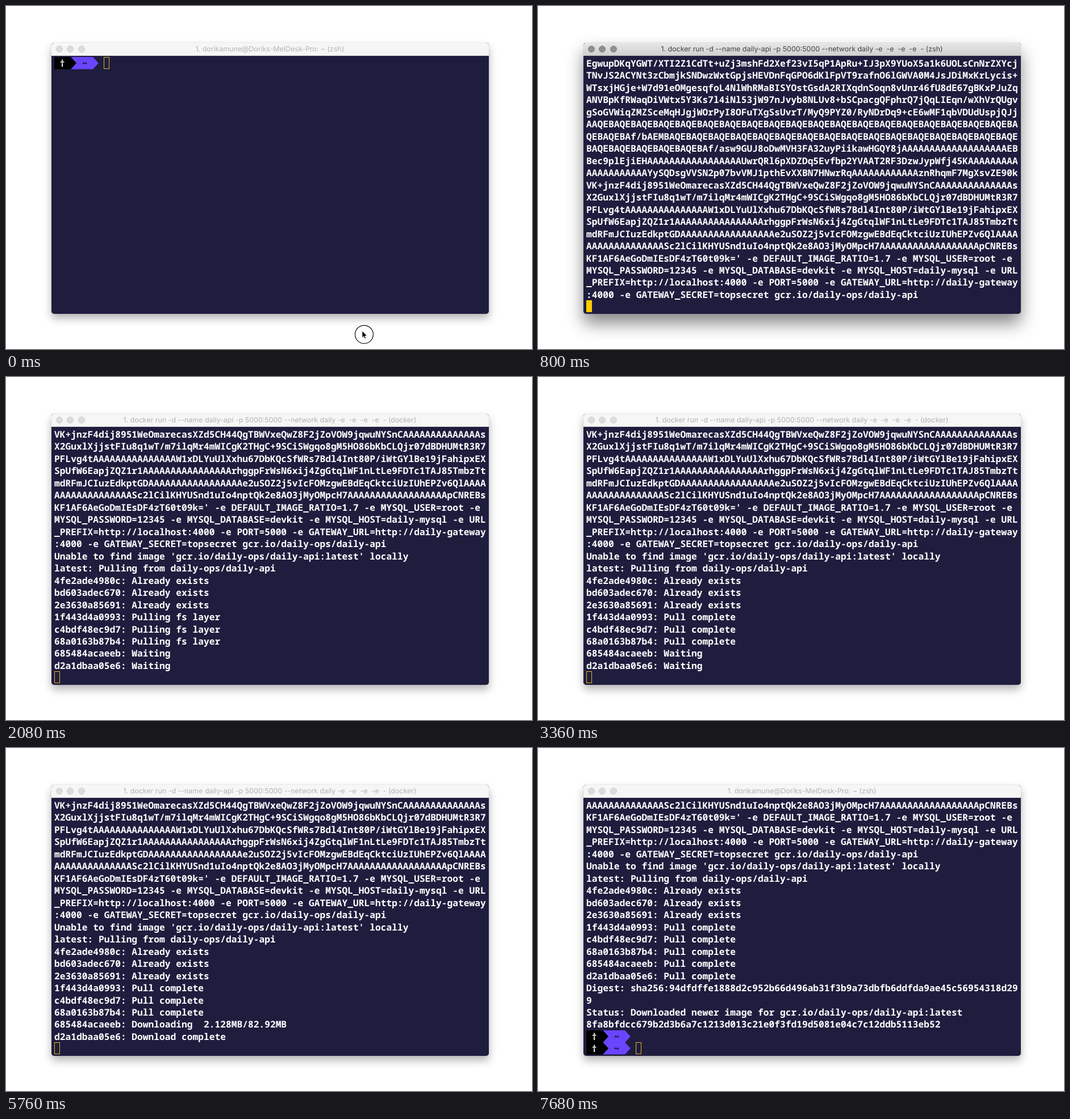
Write an HTML page that moves like this. It is 926x605 px and loops after 9.44 s.

```html
<!DOCTYPE html>
<html lang="en">
<head>
<meta charset="utf-8">
<title>Terminal</title>
<style>
  html, body { margin: 0; width: 100%; height: 100%; overflow: hidden; background: #fff; }
  #stage {
    --row: 21.47px;
    position: relative; width: 926px; height: 605px; overflow: hidden;
    text-rendering: geometricPrecision; font-kerning: none;
  }
  #stage * { position: absolute; box-sizing: border-box; }

  #window {
    left: 80px; top: 65px; width: 770px; height: 478px;
    border-radius: 5px; background: #1f1d3e;
    box-shadow: 0 0 1px rgba(0,0,0,.45), 0 8px 15px rgba(0,0,0,.3);
  }
  #bar {
    left: 0; top: 0; width: 770px; height: 23px;
    border-radius: 5px 5px 0 0; border-bottom: 1px solid #d4d4d4; background: #f6f6f6;
  }
  #bar i {
    top: 5px; width: 12px; height: 12px; border-radius: 50%;
    background: #dcdcdc; border: 1px solid #cfcfcf;
  }
  #title {
    left: 0; top: 0; width: 769px; text-align: center; white-space: pre;
    font: 12.45px/23px Inter, Roboto, sans-serif; color: #b3b3b3; font-kerning: auto;
  }
  .active #window { box-shadow: 0 0 1px rgba(0,0,0,.6), 0 17px 30px rgba(0,0,0,.47); }
  .active #bar { background: linear-gradient(#e8e7e8, #d1d0d1); border-color: #b2b1b2; }
  .active #bar i { background: #8f8f8f; border-color: #868686; }
  .active #title { color: #444; }

  #text {
    left: 85px; top: 91px; margin: 0; white-space: pre; color: #fff;
    font: 600 16.24px/var(--row) "Noto Sans Mono", "DejaVu Sans Mono", monospace;
    font-variant-ligatures: none;
  }
  .prompt { left: 85px; width: 78px; height: 21.5px; overflow: visible; }
  .prompt text { font: 700 16.24px "Noto Sans Mono", "DejaVu Sans Mono", monospace; text-anchor: middle; }
  #caret { width: 10px; height: 21px; border: 1px solid #e3b51c; }
  .active #caret { background: #fc0; border-color: #fc0; }
  #pointer { left: 0; top: 0; width: 926px; height: 605px; }
</style>
</head>
<body>
<div id="stage">
  <div id="window">
    <div id="bar">
      <i style="left:8px"></i><i style="left:27px"></i><i style="left:47px"></i>
      <div id="title"></div>
    </div>
  </div>
  <pre id="text"></pre>
  <div id="caret"></div>
  <svg id="pointer" fill="none">
    <circle id="ring" r="16" stroke="#111118" stroke-width="1.2"/>
    <path id="arrow" d="M627 573v12.3l2.8-2.6 1.9 4.2 2-.9-1.9-4.1h3.9z" fill="#000" stroke="#fff" stroke-width=".8"/>
    <path id="beam" d="M-2-8q2 0 2 2v12q0 2-2 2M2-8q-2 0-2 2M0 6q0 2 2 2" stroke="#9696a2"/>
  </svg>
</div>
<script>
const LOOP = 9440, ROWS = 21, COLS = 78, CELL = 9.744, ROW = 21.47, LEFT = 85, TOP = 90;
const $ = id => document.getElementById(id);

// Seeded filler for the long argument and the hashes.
let seed = 7;
const random = () => (seed = (seed * 48271) % 2147483647) / 2147483647;
const pick = chars => chars[Math.floor(random() * chars.length)];
const fill = (n, chars) => Array.from({ length: n }, () => pick(chars)).join('');
const upper = 'ABCDEFGHIJKLMNOPQRSTUVWXYZ', lower = upper.toLowerCase(), digits = '0123456789';
const noise = n => fill(n, upper + upper + lower + lower + digits + digits + '/+');
const hex = n => fill(n, digits + 'abcdef');
const sparse = n => fill(n, 'A'.repeat(50) + 'QgBEDMTYIw');
// Alternates noise and runs of one letter, by length.
const mix = (...lengths) => lengths.map((n, i) => i % 2 ? 'A'.repeat(n) : noise(n)).join('');

const mime = 'image/jpg', coding = 'base64';
const command = [
  '         docker run -d --name daily-api -p 5000:5000 --network daily -e DEFAUL',
  'T_IMAGE_URL=https://storage.cloud.google.com/devkit-assets/placeholder.jpg -e ',
  `DEFAULT_IMAGE_PLACEHOLDER='data:${mime};${coding},` + noise(29),
  noise(9) + sparse(69),
  sparse(COLS),
  sparse(49) + '/+' + noise(27),
  ...Array.from({ length: 12 }, () => noise(COLS)),
  'AA' + 'QEBA'.repeat(19),
  'QEBAQEBAf/bAEMB' + 'AQEB'.repeat(15) + 'AQE',
  'BAQE'.repeat(5) + 'BAf/' + mix(33, 19) + 'EB',
  mix(11, 17, 41, 9),
  mix(0, 11, 37, 12, 18),
  mix(63, 14, 1),
  noise(COLS),
  mix(7, 15, 56),
  mix(16, 16, 46),
  mix(17, 17, 40, 4),
  mix(0, 14, 39, 18, 7),
  noise(24) + "9k=' -e DEFAULT_IMAGE_RATIO=1.7 -e MYSQL_USER=root -e ",
  'MYSQL_PASSWORD=12345 -e MYSQL_DATABASE=devkit -e MYSQL_HOST=daily-mysql -e URL',
  '_PREFIX=http://localhost:4000 -e PORT=5000 -e GATEWAY_URL=http://daily-gateway',
  ':4000 -e GATEWAY_SECRET=topsecret gcr.io/daily-ops/daily-api',
  "Unable to find image 'gcr.io/daily-ops/daily-api:latest' locally",
  'latest: Pulling from daily-ops/daily-api'
];
const result = [
  'Digest: sha256:94dfdffe' + hex(52) + 'd29',
  '9',
  'Status: Downloaded newer image for gcr.io/daily-ops/daily-api:latest',
  '8fa8bfdc' + hex(52) + 'eb52'
];
const layerIds = ['4fe2ade4980c', 'bd603adec670', '2e3630a85691', '1f443d4a0993',
  'c4bdf48ec9d7', '68a0163b87b4', '685484acaeeb', 'd2a1dbaa05e6'];

// Each timeline entry starts with its time; the last one reached applies.
const views = [ // time, first line, end line, caret column, caret row
  [0, 0, 0, 9, 0],
  [480, 0, 15, 65, 14],
  [640, 12, 33, 60, 20],
  [800, 13, 33, 0, 20],
  [1280, 14, 34, 0, 20],
  [2080, 23, 43, 0, 20],
  [7680, 28, 47, 9, 20]
];
const shell = '1. dorikamune@Doriks-MelDesk-Pro: ~ (zsh)';
const running = '1. docker run -d --name daily-api -p 5000:5000 --network daily -e  -e  -e  -e  - ';
const titles = [[0, shell], [800, running + '(zsh)'], [1760, running + '(docker)'], [7680, shell]];
const early = [[0, 'Pulling fs layer'], [3360, 'Pull complete']];
const last = [[0, 'Waiting'], [4480, 'Download complete'], [7680, 'Pull complete']];
const amounts = [[4480, '525.1kB'], [4960, '1.049MB'], [5440, '1.589MB'], [5760, '2.128MB'],
  [6080, '2.669MB'], [6240, '81.29MB'], [6880, '81.83MB'], [7040, '82.37MB'], [7360, '82.91MB']];
const big = [[0, 'Waiting'],
  ...amounts.map(([at, n]) => [at, `Downloading  ${n}/82.92MB`]), [7680, 'Pull complete']];

const current = (list, t) => list.filter(entry => entry[0] <= t).pop();

function layers(t) {
  return layerIds.map((id, i) => {
    const status = i < 3 ? 'Already exists' : current(i < 6 ? early : i < 7 ? big : last, t)[1];
    return `${id}: ${status}`;
  });
}

const prompts = [0, 47, 48].map(line => {
  $('text').insertAdjacentHTML('beforebegin', `<svg class="prompt">
    <path d="M29 0H68L77.8 10.75 68 21.5H29z" fill="#6a45ff"/>
    <path d="M0 0H29.2L39 10.75 29.2 21.5H0z" fill="#000"/>
    <text x="14" y="17" fill="#fff">†</text><text x="53.6" y="17" fill="#000">~</text></svg>`);
  return { line, el: $('text').previousElementSibling };
});

function show(el, visible) { el.style.display = visible ? '' : 'none'; }

function drawPointer(t) {
  const outside = t < 160, clicking = t >= 160 && t < 320;
  show($('arrow'), outside);
  show($('ring'), outside || clicking);
  show($('beam'), !outside && t < 640);
  $('ring').setAttribute('transform', outside ? 'translate(630.5 579.3)' : 'translate(624 373)');
  $('beam').setAttribute('transform', clicking ? 'translate(624.5 373)' : 'translate(619.5 372)');
}

function draw(t) {
  const [, first, end, col, row] = current(views, t);
  const lines = [...command, ...layers(t), ...result].slice(first, end);
  if (end === 15) lines[14] = lines[14].slice(0, col);
  $('text').textContent = lines.join('\n');
  for (const { line, el } of prompts) {
    const r = line - first;
    show(el, r >= 0 && r < ROWS);
    el.style.top = TOP + r * ROW + 'px';
  }
  $('caret').style.left = Math.round(LEFT + col * CELL - .3) + 'px';
  $('caret').style.top = Math.round(TOP + row * ROW) + 'px';
  $('title').textContent = current(titles, t)[1];
  $('stage').classList.toggle('active', t >= 160 && t < 1600);
  drawPointer(t);
}

const start = performance.now();
let drawn = -1;
function tick() {
  // Everything changes on a 160 ms beat.
  const beat = Math.floor((performance.now() - start) % LOOP / 160);
  if (beat !== drawn) draw((drawn = beat) * 160);
  requestAnimationFrame(tick);
}
tick();
</script>
</body>
</html>
```
